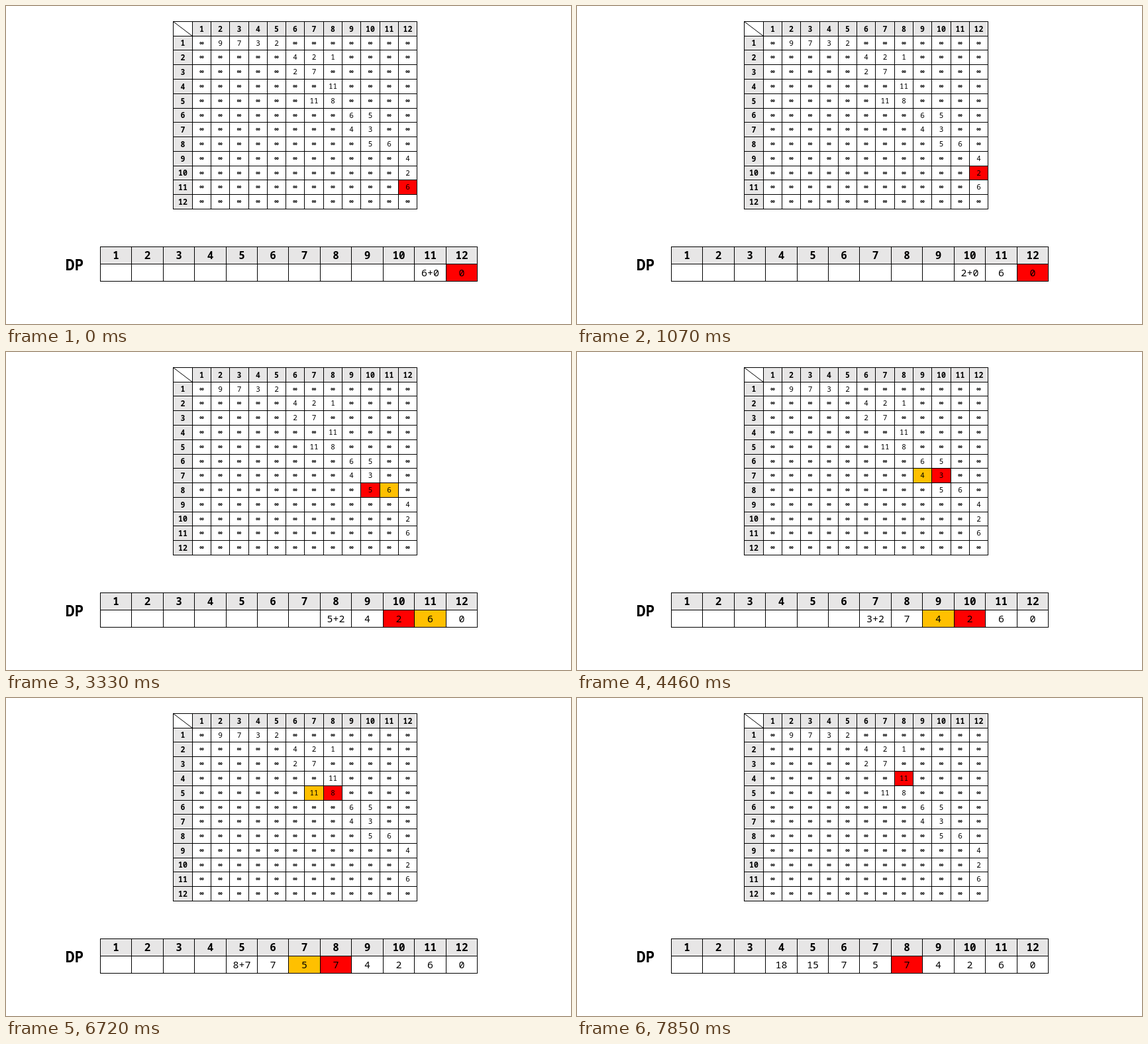
An HTML page that plays this animation: 853x480 px, repeating every 8 s.

```html
<!DOCTYPE html>
<html lang="en">
<head>
<meta charset="utf-8">
<title>Shortest path table</title>
<style>
  html, body { margin: 0; width: 100%; height: 100%; overflow: hidden; background: #fff; }
  svg { display: block; width: 100%; height: 100%; }
  text { font-family: "Noto Sans Mono", "DejaVu Sans Mono", monospace; text-anchor: middle; fill: #000; }
  .bold { font-weight: 700; }
</style>
</head>
<body>
<svg id="stage" viewBox="0 0 853 480"></svg>
<script>
const N = 12, LOOP = 8000, FIRST = 1070, STEP = 1130, LAST_ROW = 4;
const WHITE = '#fff', GREY = '#e7e6e6', RED = '#ff0000', AMBER = '#ffc000';
const edges = {
  1: {2: 9, 3: 7, 4: 3, 5: 2},
  2: {6: 4, 7: 2, 8: 1},
  3: {6: 2, 7: 7},
  4: {8: 11},
  5: {7: 11, 8: 8},
  6: {9: 6, 10: 5},
  7: {9: 4, 10: 3},
  8: {10: 5, 11: 6},
  9: {12: 4}, 10: {12: 2}, 11: {12: 6}, 12: {}
};

const stage = document.getElementById('stage');
function add(tag, attrs) {
  const node = document.createElementNS('http://www.w3.org/2000/svg', tag);
  for (const key in attrs) node.setAttribute(key, attrs[key]);
  return stage.appendChild(node);
}

function label(x, y, size, content, bold) {
  const node = add('text', {x, y: y + size * 0.357, 'font-size': size, class: bold ? 'bold' : ''});
  node.textContent = content;
  return node;
}

// Grid lines sit on whole pixels, so cells vary by one pixel.
const matrixX = i => Math.round(252.4 + 28.29 * i) + 0.5;
const matrixY = i => Math.round(22.8 + 21.79 * i) + 0.5;
const stripX = i => Math.round(141.9 + 47.42 * i) + 0.5;
const stripY = i => 363.5 + 26 * i;

function cell(xAt, yAt, col, row, fill, content, size, bold) {
  const x = xAt(col), y = yAt(row), width = xAt(col + 1) - x, height = yAt(row + 1) - y;
  const box = add('rect', {x, y, width, height, fill, stroke: '#000', 'stroke-width': 1});
  const text = label(x + width / 2, y + height / 2, size, content, bold);
  return {box, text};
}

const matrix = {}, strip = {};
for (let row = 0; row <= N; row++) {
  matrix[row] = {};
  for (let col = 0; col <= N; col++) {
    const head = row * col === 0;
    const content = head ? row + col || '' : edges[row][col] || '∞';
    const fill = head && row + col ? GREY : WHITE;
    matrix[row][col] = cell(matrixX, matrixY, col, row, fill, content,
      head ? 11.5 : 11, head || content === '∞');
  }
}
add('line', {x1: matrixX(0), y1: matrixY(0), x2: matrixX(1), y2: matrixY(1), stroke: '#000'});

for (let i = 1; i <= N; i++) {
  cell(stripX, stripY, i - 1, 0, GREY, i, 16, true);
  strip[i] = cell(stripX, stripY, i - 1, 1, WHITE, '', 15, false);
}
label(103.5, 390.5, 22.5, 'DP', true);

// Best cost and next node, from the end backwards.
const cost = {[N]: 0}, next = {};
for (let row = N - 1; row > 0; row--) {
  const total = col => edges[row][col] + cost[col];
  next[row] = Object.keys(edges[row]).map(Number).reduce((a, b) => total(b) < total(a) ? b : a);
  cost[row] = total(next[row]);
}

function show(active) {
  for (let row = 1; row <= N; row++) {
    for (const col in edges[row]) matrix[row][col].box.setAttribute('fill', WHITE);
    strip[row].box.setAttribute('fill', WHITE);
    strip[row].text.textContent = row >= active ? cost[row] : '';
  }
  const best = next[active];
  for (const col in edges[active]) {
    const fill = +col === best ? RED : AMBER;
    matrix[active][col].box.setAttribute('fill', fill);
    strip[col].box.setAttribute('fill', fill);
  }
  if (active > LAST_ROW) {
    strip[active].text.textContent = edges[active][best] + '+' + cost[best];
  }
}

let shown;
const start = performance.now();
function tick() {
  const time = (performance.now() - start) % LOOP;
  const step = time < FIRST ? 0 : 1 + Math.floor((time - FIRST) / STEP);
  const active = N - 1 - step;
  if (active !== shown) show(shown = active);
  requestAnimationFrame(tick);
}
tick();
</script>
</body>
</html>
```
